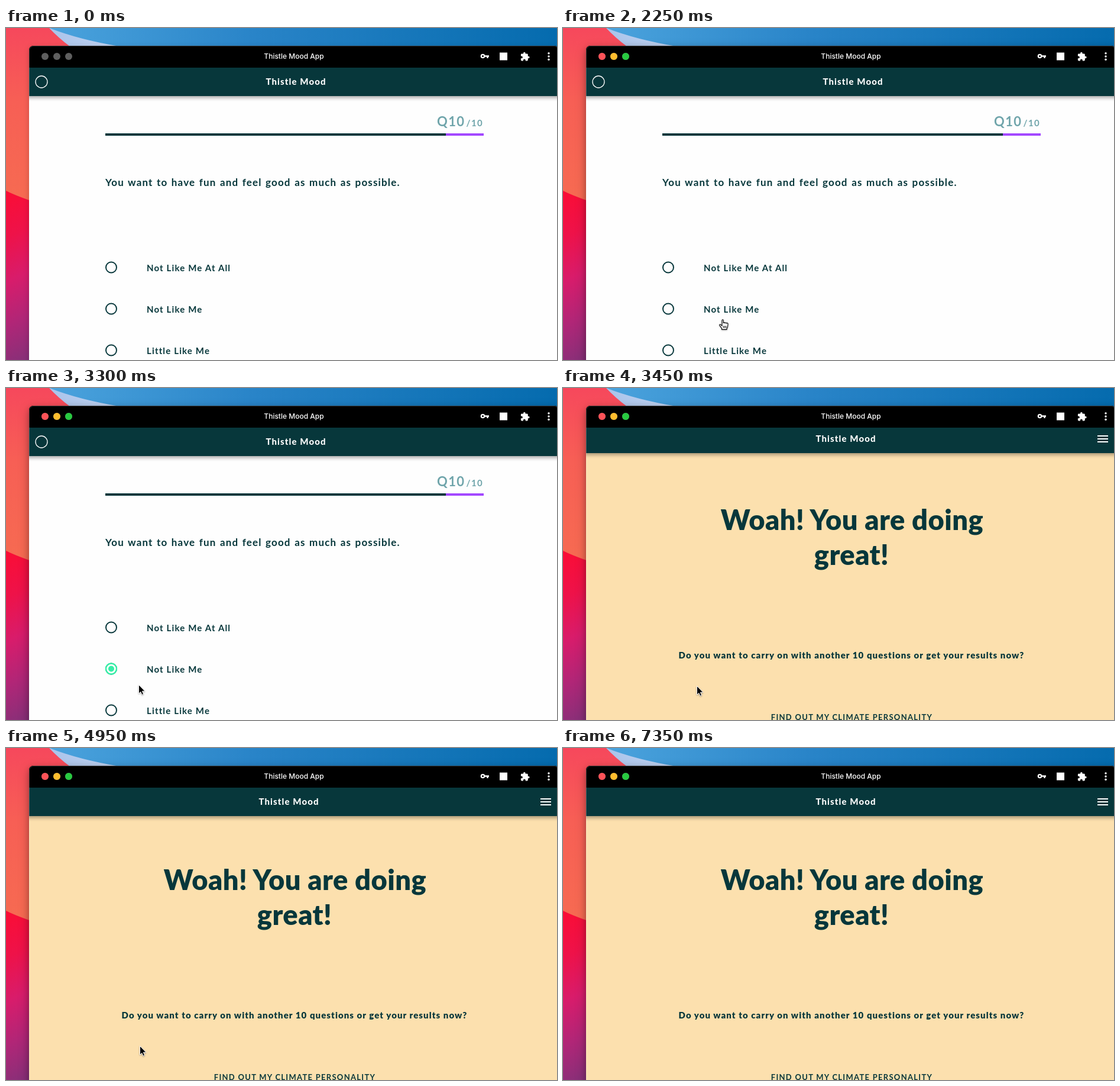
An HTML page for the animation above (8000 ms loop, 932x561 px).

```html
<!DOCTYPE html>
<html lang="en">
<head>
<meta charset="utf-8">
<title>Quiz</title>
<style>
  html, body { margin: 0; width: 100%; height: 100%; overflow: hidden; }
  svg { display: block; width: 932px; height: 561px; }

  text { font-family: Lato, "Open Sans", sans-serif; font-weight: 700; fill: #07373b; }
  .mid { text-anchor: middle; }
  .title { font: 500 12px Inter, Roboto, sans-serif; fill: #fff; }
  .brand { font-size: 15px; font-weight: 800; letter-spacing: 1.1px; fill: #fff; }
  .count { fill: #70a5ab; letter-spacing: 1.4px; }
  .ask { font-size: 17px; letter-spacing: 1.15px; word-spacing: 1.2px; }
  .option { font-size: 15px; letter-spacing: 1.15px; }
  .cheer { font-size: 47px; font-weight: 900; letter-spacing: .45px; }
  .prompt { font-size: 15px; font-weight: 900; letter-spacing: 1.06px; }
  .button { font-size: 13px; letter-spacing: 1.28px; }

  .bar { fill: #07373b; filter: drop-shadow(0 3px 3px rgba(0, 0, 0, .35)); }
  .ring { fill: none; stroke: #07373b; stroke-width: 2; }
  .idle { filter: drop-shadow(0 3px 5px rgba(0, 0, 0, .2)); }
  .focus { filter: drop-shadow(0 7px 9px rgba(0, 0, 0, .25)); }
  .cursor { filter: drop-shadow(0 1px 1px rgba(0, 0, 0, .35)); }

  /* Every 150 ms step of the 8 s loop is 1.875 %. */
  .focus, .lights, .chosen, .dot, .result, .slide, .arrow, .hand {
    animation: 8s step-end infinite;
  }
  .focus, .lights { animation-name: activate; }
  .chosen { animation-name: choose; }
  .dot { animation-name: grow; transform-origin: 178px 474.5px; }
  .result { animation-name: turn; }
  .slide { animation-name: settle; }
  .arrow { animation-name: arrow; }
  .hand { animation-name: hand; }

  @keyframes activate { 0% { opacity: 0 } 20.625%, 100% { opacity: 1 } }
  @keyframes choose { 0% { opacity: 0 } 31.875%, 100% { opacity: 1 } }
  @keyframes grow { 0% { transform: scale(.4) } 33.75%, 100% { transform: none } }
  @keyframes turn { 0% { opacity: 0 } 43.125%, 100% { opacity: 1 } }
  @keyframes settle { 0% { transform: translateY(-5px) } 45%, 100% { transform: none } }

  @keyframes arrow {
    0%      { opacity: 0; transform: translate(272px, 517px) }
    9.375%  { opacity: 1; transform: translate(272px, 517px) }
    11.25%  { opacity: 1; transform: translate(274px, 507px) }
    13.125% { opacity: 1; transform: translate(277px, 496px) }
    15%     { opacity: 1; transform: translate(280px, 486px) }
    16.875% { opacity: 1; transform: translate(282px, 479px) }
    24.375% { opacity: 0; transform: translate(282px, 479px) }
    39.375% { opacity: 1; transform: translate(232px, 501px) }
    41.25%  { opacity: 1; transform: translate(224px, 501px) }
    43.125% { opacity: 1; transform: translate(226px, 503px) }
    78.75%  { opacity: 1; transform: translate(237px, 504px) }
    80.625% { opacity: 1; transform: translate(256px, 507px) }
    82.5%   { opacity: 1; transform: translate(268px, 510px) }
    88.125% { opacity: 1; transform: translate(305px, 518px) }
    90%     { opacity: 1; transform: translate(364px, 535px) }
    91.875%, 100% { opacity: 0; transform: translate(364px, 535px) }
  }
  @keyframes hand {
    0%      { opacity: 0; transform: translate(283px, 487px) }
    24.375% { opacity: 1; transform: translate(283px, 487px) }
    26.25%  { opacity: 1; transform: translate(272px, 490px) }
    28.125% { opacity: 1; transform: translate(264px, 492px) }
    37.5%   { opacity: 1; transform: translate(257px, 493px) }
    39.375%, 100% { opacity: 0; transform: translate(257px, 493px) }
  }
</style>
</head>
<body>
<svg viewBox="0 0 932 561">
  <defs>
    <linearGradient id="sky">
      <stop offset=".08" stop-color="#4ba3dd"/>
      <stop offset=".45" stop-color="#2984c8"/>
      <stop offset="1" stop-color="#056bae"/>
    </linearGradient>
    <linearGradient id="pale">
      <stop offset="0" stop-color="#a9c3ea"/>
      <stop offset="1" stop-color="#c3d4f1"/>
    </linearGradient>
    <linearGradient id="coral" x2="0" y2="1">
      <stop offset="0" stop-color="#f6485c"/>
      <stop offset=".4" stop-color="#f75f55"/>
      <stop offset="1" stop-color="#f66c51"/>
    </linearGradient>
    <linearGradient id="berry" gradientUnits="userSpaceOnUse" x1="0" y1="280" x2="120" y2="520">
      <stop offset="0" stop-color="#fa0d36"/>
      <stop offset=".25" stop-color="#ee1249"/>
      <stop offset=".5" stop-color="#d81c6b"/>
      <stop offset=".75" stop-color="#b02677"/>
      <stop offset="1" stop-color="#863078"/>
    </linearGradient>
    <clipPath id="pane"><path d="M39 67H932V561H39Z"/></clipPath>
  </defs>

  <!-- Desktop -->
  <path fill="url(#sky)" d="M0 0H932V60H0Z"/>
  <path fill="url(#pale)" d="M73 0Q125 20 192 31V40H90Z"/>
  <path fill="url(#coral)" d="M0 0H73Q89 17 108 31V310H0Z"/>
  <path fill="url(#berry)" d="M0 275Q20 285 60 298V561H0Z"/>

  <!-- Window -->
  <rect class="idle" x="39" y="30" width="896" height="560" rx="8"/>
  <rect class="focus" x="39" y="30" width="896" height="560" rx="8"/>

  <g clip-path="url(#pane)">
    <path fill="#fefefe" d="M39 67H932V561H39Z"/>
    <path class="bar" d="M30 67H940V115H30Z"/>
    <circle cx="60" cy="91" r="10" fill="none" stroke="#fff" stroke-width="1.3"/>
    <text class="brand mid" x="490.5" y="95.5">Thistle Mood</text>

    <text class="count" x="729" y="166" font-size="22">Q10</text>
    <text class="count" x="778.5" y="166" font-size="15">/10</text>
    <path fill="#07373b" d="M168 178H744V182H168Z"/>
    <path fill="#a347ff" d="M744 178H808V182H744Z"/>
    <text class="ask" x="168" y="267">You want to have fun and feel good as much as possible.</text>

    <circle class="ring" cx="178" cy="404.5" r="9"/>
    <circle class="ring" cx="178" cy="474.5" r="9"/>
    <circle class="ring" cx="178" cy="544.5" r="9"/>
    <g class="chosen">
      <circle cx="178" cy="474.5" r="9" fill="#fefefe" stroke="#35efa7" stroke-width="2.4"/>
      <circle class="dot" cx="178" cy="474.5" r="5" fill="#35efa7"/>
    </g>
    <text class="option" x="238" y="411">Not Like Me At All</text>
    <text class="option" x="238" y="481">Not Like Me</text>
    <text class="option" x="238" y="551">Little Like Me</text>

    <g class="result">
      <path fill="#fce0ae" d="M39 67H932V561H39Z"/>
      <g class="slide">
        <path class="bar" d="M30 62H940V115H30Z"/>
        <text class="brand mid" x="478.5" y="95.5">Thistle Mood</text>
        <path stroke="#fff" stroke-width="2" d="M904 86h18m-18 5h18m-18 5h18"/>
      </g>
      <text class="cheer mid" x="489" y="240">Woah! You are doing</text>
      <text class="cheer mid" x="488" y="299">great!</text>
      <text class="prompt mid" x="488" y="457">Do you want to carry on with another 10 questions or get your results now?</text>
      <text class="button mid" x="488.5" y="561">FIND OUT MY CLIMATE PERSONALITY</text>
    </g>
  </g>

  <!-- Title bar -->
  <path d="M39 67V38Q39 30 47 30H927Q932 30 934 34V67Z"/>
  <rect x="39.5" y="30.5" width="895" height="560" rx="7.5" fill="none" stroke="#fff" stroke-opacity=".2"/>
  <g fill="#5f5f5f">
    <circle cx="66" cy="48" r="6"/><circle cx="86" cy="48" r="6"/><circle cx="106" cy="48" r="6"/>
  </g>
  <g class="lights">
    <circle cx="66" cy="48" r="6" fill="#ff5257"/>
    <circle cx="86" cy="48" r="6" fill="#ffbd2e"/>
    <circle cx="106" cy="48" r="6" fill="#28c940"/>
  </g>
  <text class="title mid" x="487" y="52">Thistle Mood App</text>
  <g fill="#fff">
    <path fill="none" stroke="#fff" stroke-width="2.4" d="M809 47.5H817M814.5 47.5V51"/>
    <circle cx="806.5" cy="47.5" r="2.7" fill="none" stroke="#fff" stroke-width="2.2"/>
    <rect x="835" y="41.5" width="13" height="13"/>
    <path transform="translate(869.5 40) scale(.7)" d="M20.5 11H19V7c0-1.1-.9-2-2-2h-4V3.5a2.5 2.5 0 0 0-5 0V5H4a2 2 0 0 0-2 2v3.8h1.5a2.7 2.7 0 0 1 0 5.4H2V20a2 2 0 0 0 2 2h3.8v-1.5a2.7 2.7 0 0 1 5.4 0V22H17a2 2 0 0 0 2-2v-4h1.5a2.5 2.5 0 0 0 0-5z"/>
    <circle cx="918" cy="42.7" r="1.7"/><circle cx="918" cy="48" r="1.7"/><circle cx="918" cy="53.3" r="1.7"/>
  </g>

  <!-- Pointers -->
  <g class="arrow">
    <path class="cursor" stroke="#fff" d="M.5 .5V15.5L3.8 12.4L6 17.4L8.6 16.3L6.4 11.3H11Z"/>
  </g>
  <g class="hand">
    <g class="cursor" fill="#fff" stroke="#000" stroke-width="1.1" stroke-linejoin="round">
      <path d="M5 11.5L3 9.3C1.8 8.2 .3 9.2 1 10.6L4.6 15.5V17.4H13V16C14.8 13.5 15 11 15 7.6C15 6.1 13 6.1 12.7 7.2C12.5 5.7 10.3 5.7 10 6.8C9.7 5.3 7.6 5.3 7.3 6.4V2.2C7.3 .2 5 .2 5 2.2Z"/>
      <path d="M7.3 11.5v3.2m2.2-3.2v3.2m2.2-3.2v3.2"/>
    </g>
  </g>
</svg>
</body>
</html>
```
